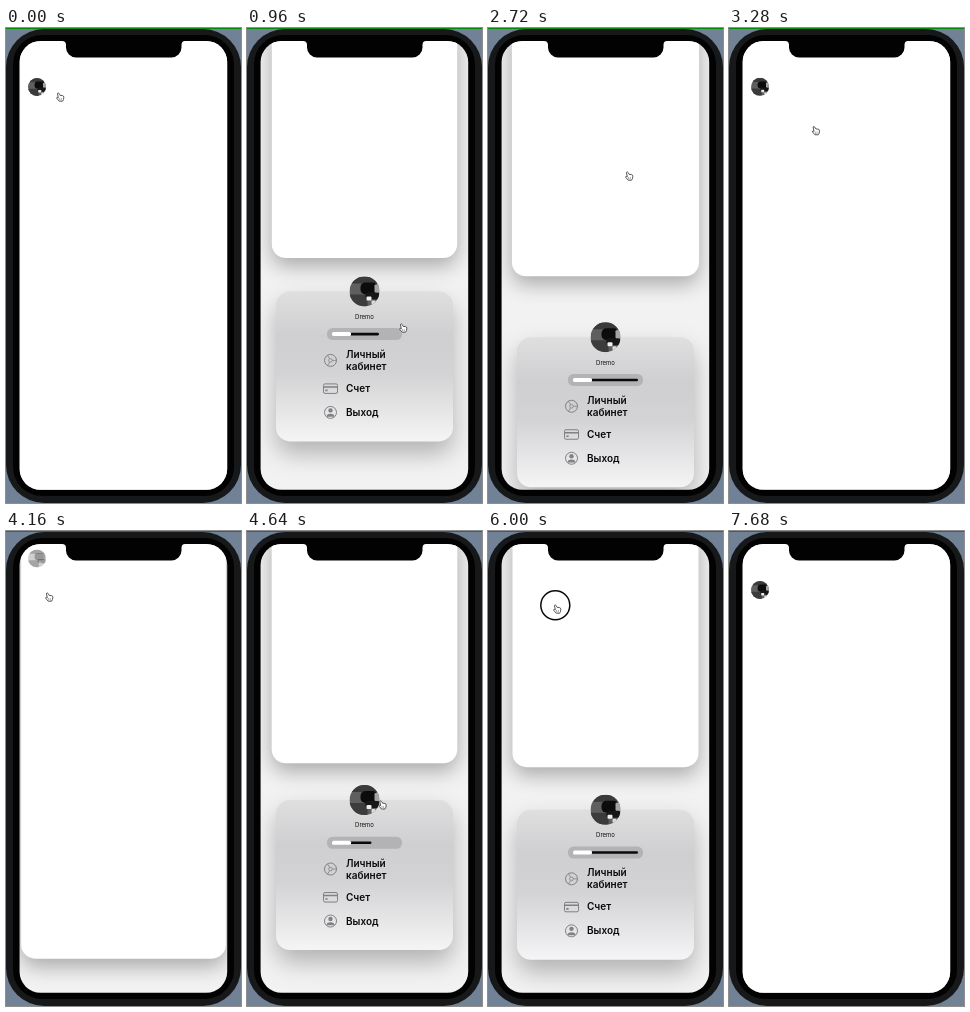
Write an HTML page with a canvas that moves like this. It is 235 px wide and 475 px high and loops after 7.76 s.

```html
<!DOCTYPE html>
<html lang="ru">
<head>
<meta charset="utf-8">
<style>
html, body { margin: 0; width: 100%; height: 100%; overflow: hidden; background: #718196; }
canvas { display: block; }
</style>
</head>
<body>
<canvas id="stage" width="235" height="475"></canvas>
<script>
const c = document.getElementById('stage').getContext('2d');
const LOOP = 7760, MID = 117.5, REST = 263.4;

// Cursor path: time, x, y
const path = [
  [0, 54, 69], [80, 49, 69], [240, 49, 69], [960, 156, 300], [1200, 151, 309],
  [1600, 151, 149], [2000, 151, 309], [2500, 141, 148], [2800, 141, 148],
  [3700, 43, 66], [4160, 43, 66], [4800, 151, 309], [5200, 151, 149],
  [5550, 151, 309], [5900, 69, 78], [6100, 69, 78], [6700, 54, 69], [7360, 54, 69]
];
const drags = [[1200, 2000], [4800, 5550]];
const taps = [[2440, 2620], [3940, 4080], [5860, 6040]];
const visits = [[180, 2594], [3985, 5928]];   // menu opens, menu closes

const clamp = v => Math.max(0, Math.min(1, v));
const ease = v => (1 - Math.cos(Math.PI * clamp(v))) / 2;
const within = (t, spans) => spans.some(([a, b]) => t >= a && t < b);

function cursorAt(t) {
  const i = path.findIndex(k => k[0] > t);
  if (i < 0) return null;
  const [t0, x0, y0] = path[i - 1], [t1, x1, y1] = path[i];
  const u = ease((t - t0) / (t1 - t0));
  return { x: x0 + (x1 - x0) * u, y: y0 + (y1 - y0) * u };
}

function box(x, y, w, h, r, fill) {
  c.beginPath();
  c.roundRect(x, y, w, h, r);
  c.fillStyle = fill;
  c.fill();
}

function disc(x, y, r, fill) {
  c.beginPath();
  c.arc(x, y, r, 0, 7);
  c.fillStyle = fill;
  c.fill();
}

function ring(x, y, r, color, width) {
  c.beginPath();
  c.arc(x, y, r, 0, 7);
  c.strokeStyle = color;
  c.lineWidth = width;
  c.stroke();
}

function line(color, width, ...pts) {
  c.beginPath();
  pts.forEach(p => c.lineTo(...p));
  c.strokeStyle = color;
  c.lineWidth = width;
  c.stroke();
}

function withShadow(blur, dy, alpha, draw) {
  c.save();
  c.shadowColor = `rgba(0,0,0,${alpha})`;
  c.shadowBlur = blur;
  c.shadowOffsetY = dy;
  draw();
  c.restore();
}

function avatar(x, y, r, alpha = 1) {
  c.save();
  c.globalAlpha = alpha;
  c.translate(x, y);
  c.scale(r / 15, r / 15);
  c.beginPath();
  c.arc(0, 0, 15, 0, 7);
  c.clip();
  box(-15, -15, 30, 30, 0, '#5f5f5f');
  box(-15, -15, 30, 7, 0, '#3a3a3a');
  box(-4, -9, 17, 12, 5, '#0c0c0c');
  box(-15, 3, 18, 12, 0, '#3c3c3c');
  box(1, 1, 14, 7, 2, '#161616');
  box(10, -7, 5, 8, 1, '#a5a5a5');
  box(2, 5, 5, 4, 1, '#eee');
  box(7, 9, 4, 4, 1, '#ddd');
  c.restore();
}

function sheet(bottom, half, tilt) {
  const r = 14, top = half + 0.078 * tilt * bottom;
  c.beginPath();
  c.moveTo(MID - top, 0);
  c.lineTo(MID + top, 0);
  c.arcTo(MID + half, bottom, MID, bottom, r);
  c.arcTo(MID - half, bottom, MID - top, 0, r);
  c.closePath();
  c.fillStyle = '#fff';
  withShadow(20, 8, 0.3, () => c.fill());
}

function icons() {
  const gray = '#808085';
  ring(83.5, 69, 6, gray, 1);
  ring(83.5, 69, 1.8, gray, 0.8);
  for (const a of [0, 2.09, 4.19]) {
    const x = Math.cos(a), y = Math.sin(a);
    line(gray, 0.8, [83.5 + 2 * x, 69 + 2 * y], [83.5 + 6 * x, 69 + 6 * y]);
  }
  c.beginPath();
  c.roundRect(76.5, 92.5, 14, 9.5, 1.5);
  c.lineWidth = 1;
  c.stroke();
  line(gray, 1.5, [76.5, 95.5], [90.5, 95.5]);
  line(gray, 1.6, [78.3, 99], [80.6, 99]);
  ring(83.5, 121, 6, gray, 1);
  disc(83.5, 119, 2.2, gray);
  c.beginPath();
  c.ellipse(83.5, 125.3, 4, 3, 0, Math.PI, 0);
  c.fill();
}

function menu(y, bar) {
  c.save();
  c.translate(0, y);
  const g = c.createLinearGradient(0, 0, 0, 150);
  g.addColorStop(0, '#dfdfe0');
  g.addColorStop(0.3, '#cfcfd1');
  g.addColorStop(0.55, '#d3d3d5');
  g.addColorStop(1, '#f5f5f6');
  withShadow(24, 12, 0.27, () => box(29, 0, 177, 150, 14, g));
  avatar(117.5, 0, 15);
  c.fillStyle = '#111';
  c.textAlign = 'center';
  c.font = '6px Inter, sans-serif';
  c.fillText('Dremo', 117.5, 27.3);
  box(80, 36.7, 75, 12, 5.5, '#b3b3b5');
  box(85, 41.4, 65 * bar, 2.6, 1.3, '#0a0a0a');
  box(85, 40.7, Math.min(19, 65 * bar), 4, 1.5, '#fff');
  icons();
  c.fillStyle = '#0b0b0b';
  c.textAlign = 'left';
  c.font = '600 10px Inter, sans-serif';
  [['Личный', 66.6], ['кабинет', 78.6], ['Счет', 100.6], ['Выход', 124.6]]
    .forEach(([s, dy]) => c.fillText(s, 99, dy));
  c.restore();
}

const hand = new Path2D('M-2.6-3.6q1-1 1.8.2l1 1.8 2.3.2q1.4.2 1.3 1.7l-.3 2.2-.9 1.7h-3.4l-2.3-2.7q-.7-1 .4-1.1l1 .4z');

function pointer({ x, y }, pressed) {
  if (pressed) ring(x - 1.7, y - 3.7, 14.5, '#080808', 1.5);
  c.save();
  c.translate(x, y);
  c.fillStyle = '#fff';
  c.strokeStyle = '#444';
  c.lineWidth = 0.9;
  c.fill(hand);
  c.stroke(hand);
  line('#777', 0.6, [-0.5, 1], [-0.2, 3.4]);
  line('#777', 0.6, [1.3, 1], [1.3, 3.4]);
  c.restore();
}

function phone() {
  box(0, 0, 235, 475, 0, '#718196');
  box(0, 1, 235, 474, 38, '#17181a');
  box(7, 7, 221, 461, 29, '#020202');
  box(0, 0, 235, 1, 0, '#078a0c');
}

function notch() {
  c.beginPath();
  c.moveTo(56, 12);
  c.lineTo(179, 12);
  c.lineTo(179, 13);
  c.quadraticCurveTo(175.5, 13, 175.5, 17);
  c.arcTo(175.5, 29.5, 160, 29.5, 10);
  c.arcTo(60, 29.5, 60, 17, 10);
  c.lineTo(60, 17);
  c.quadraticCurveTo(60, 13, 56, 13);
  c.closePath();
  c.fillStyle = '#020202';
  c.fill();
}

function draw(t) {
  const visit = visits.filter(v => v[0] <= t).pop() || [LOOP, LOOP];
  const open = ease((t - visit[0]) / 700) - ease((t - visit[1]) / 700);
  const cursor = cursorAt(t), dragging = within(t, drags);
  const y = dragging ? cursor.y - 45 : REST + 580 * (1 - open);
  const tilt = clamp((REST - y) / 160);
  const bottom = 462 - 232 * open + 6 * tilt;

  phone();
  c.save();
  c.beginPath();
  c.roundRect(13.6, 13, 207.6, 448.8, 21);
  c.clip();
  box(13, 13, 209, 449, 0, '#f2f2f2');
  sheet(bottom, 104 - 11.3 * open + 1.5 * tilt, tilt);
  if (open < 0.2) avatar(31, 59 - 213 * open, 9, 1 - open * 4.8);
  menu(y, clamp((t - visit[0]) / 1080));
  c.restore();
  notch();
  if (cursor) pointer(cursor, dragging || within(t, taps));
}

function frame() {
  draw(performance.now() % LOOP);
  requestAnimationFrame(frame);
}
frame();
</script>
</body>
</html>
```
